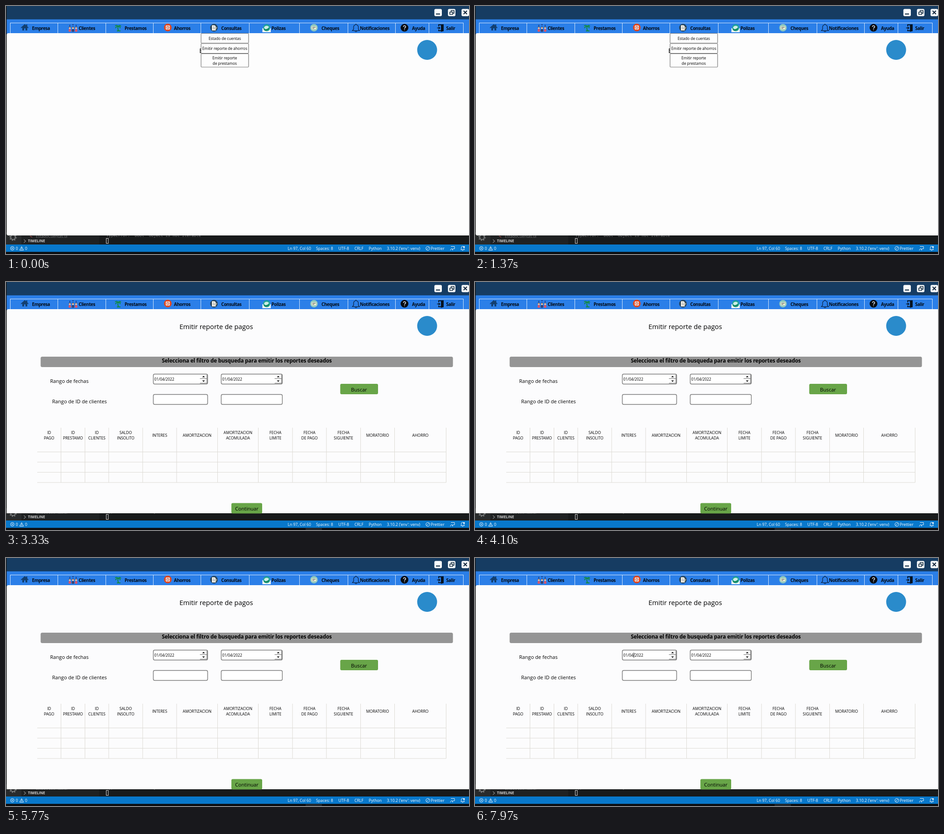
An HTML page for the animation above (8 s loop, 1023 by 548 pixels).

```html
<!DOCTYPE html>
<html lang="es">
<head>
<meta charset="utf-8">
<title>Reporte de pagos</title>
<style>
  html, body { margin: 0; width: 100%; height: 100%; overflow: hidden; background: #0c0d0f; }
  svg { display: block; width: 1023px; height: 548px; }
  text { font-family: "Open Sans", "Noto Sans", sans-serif; fill: #000; white-space: pre; }
  .mid { text-anchor: middle; }
  .menu { font-size: 9.9px; font-weight: 700; letter-spacing: -.4px; fill: #040c16; }
  .drop { font-size: 8.4px; }
  .title { font-size: 14.8px; }
  .banner { font-size: 11.8px; font-weight: 700; letter-spacing: -.17px; }
  .label { font-size: 11.1px; }
  .date { font-size: 8.3px; }
  .head { font-size: 8.6px; }
  .status { font-size: 8.7px; fill: #fff; }
  .side { font-size: 8.1px; font-weight: 700; fill: #d0d0d0; }
  .dim { font-size: 8.6px; fill: #707274; }
  .mono { font-family: "DejaVu Sans Mono", monospace; font-size: 8.7px; fill: #707274; }
</style>
</head>
<body>
<svg viewBox="0 0 1023 548">
  <!-- editor behind the window -->
  <g id="editor">
    <rect width="1023" height="548" fill="#181a1b"/>
    <rect y="500" width="34" height="27" fill="#292b2c"/>
    <rect x="34" y="500" width="172" height="27" fill="#1f2122"/>
    <circle cx="15.5" cy="511" r="5" fill="none" stroke="#7b7d7e" stroke-width="2"/>
    <circle cx="15.5" cy="511" r="7" fill="none" stroke="#7b7d7e" stroke-width="2" stroke-dasharray="2.7 2.8"/>
    <path d="M53 508l5 3" stroke="#a04848" stroke-width="1.3"/>
    <path d="M39.5 516l4 3.5-4 3.5" fill="none" stroke="#ccc"/>
    <rect x="221.5" y="513.5" width="4.500" height="11" fill="none" stroke="#ddd"/>
    <rect y="527" width="1023" height="16.5" fill="#0878cb"/>
    <rect y="543.5" width="1023" height="4.5" fill="#0b0d10"/>
    <g fill="none" stroke="#fff" stroke-width=".9">
      <circle cx="14" cy="535.5" r="4"/><path d="M12.4 533.9l3.2 3.2m0-3.2l-3.2 3.2"/>
      <path d="M34.5 531.5l4.3 8h-8.6zM34.5 534v3m0 .8v.9"/>
      <circle cx="932" cy="535.5" r="4.2"/><path d="M929 538.5l6-6"/>
      <path d="M983 531.5h8v5h-3l-2 2v-2h-1M982 540c0-5 5-5 5 0"/>
      <path d="M1005 538.5h8l-1-1.5v-3a3 3 0 0 0-6 0v3zM1008 540h2"/>
    </g>
    <circle cx="1012" cy="532.5" r="1.8" fill="#fff"/>
  </g>

  <!-- window frame -->
  <rect x="1.5" width="1022" height="30" fill="#163c62"/>
  <rect x="1.5" y="29.5" width="1022" height="32" fill="#2b7fe8"/>
  <g id="buttons"></g>
  <g fill="none" stroke="#10283e">
    <path d="M950 17.700h9" stroke-width="2.2"/>
    <path d="M980.500 13.500h6.500v5h-6.500zM983.500 13v-3h6.500v6h-3" stroke-width="1.6"/>
    <path d="M1011 10.500l7.500 7.500m0-7.500l-7.500 7.500" stroke-width="2.2"/>
  </g>
  <g id="menu"></g>

  <!-- menu icons -->
  <path d="M32.500 48l9-8 3 2.700v-2h2.500v4.300l3 3-1.500 1-1.500-1.300v6.300h-4v-4.500h-3v4.500h-4v-6.300l-1.800 1.300z" fill="#123f70"/>
  <g id="people"></g>
  <g fill="none" stroke="#118a45" stroke-width="2">
    <path d="M241 44q3.500-3 7 1q3-4 6 0M248 45q-5 0-6 4M248 45q5 0 4 4"/>
    <path d="M248 45q-2 6 1 10M245 55h8"/>
  </g>
  <circle cx="357.500" cy="47.500" r="8.500" fill="#e2481f"/>
  <rect x="353" y="43" width="9" height="9" rx="2" fill="#fff"/>
  <circle cx="357.500" cy="47.500" r="3.200" fill="#f3d2c8" stroke="#b53a22" stroke-width=".9"/>
  <path d="M357.500 45.500v2l1.500 1" fill="none" stroke="#b53a22" stroke-width=".8"/>
  <circle cx="459.500" cy="48" r="8.500" fill="#27465f"/>
  <path d="M455 42.500h6l2.500 2.500v9h-8.500z" fill="#f4f1e8"/>
  <path d="M457 46h4m-4 2.300h5m-5 2.300h5" stroke="#8a949c" stroke-width=".9"/>
  <path d="M462 52l4-5" stroke="#d7c9a6" stroke-width="1.500"/>
  <path d="M566.500 49h18.500v9h-18.500z" fill="#f2f5f2"/>
  <circle cx="576" cy="48" r="7.800" fill="#20a39a"/>
  <path d="M570 48q2-5 8-4l3 2q-2 5-8 5z" fill="#cdeee2"/>
  <path d="M570 52q5 3 11-2" fill="none" stroke="#168044" stroke-width="2"/>
  <circle cx="680.500" cy="48" r="8.300" fill="#91c9bf"/>
  <rect x="675.500" y="45" width="10" height="6.500" fill="#f0ead2"/>
  <path d="M677 47h7" stroke="#4c6b70" stroke-width="1.300"/><path d="M677 49.500h4" stroke="#4c6b70"/>
  <path d="M765.500 54.500h15.500l-2.500-3v-5a5.200 5.200 0 0 0-10.500 0v5zM771 55a2.300 2.300 0 0 0 4.500 0M773.200 41v-2" fill="none" stroke="#0a1c38" stroke-width="1.200"/>
  <circle cx="880.500" cy="48" r="8.600" fill="#080b10"/>
  <path d="M878.200 46a2.400 2.400 0 1 1 3.500 2q-1.200.6-1.200 2M880.500 51.600v1.600" fill="none" stroke="#dfe8f4" stroke-width="1.500"/>
  <path d="M955 40.500h12v15h-12v-3h2v1h4v-11h-4v2h-2z" fill="#071321"/>
  <path d="M961 42l5.500-1.500v15l-5.500 1.500z" fill="#071321"/>
  <path d="M952.500 48.500h6m-2.500-2.500l2.500 2.500-2.500 2.500" fill="none" stroke="#071321" stroke-width="1.700"/>

  <!-- empty page with its drop-down -->
  <g id="before">
    <path d="M1.500 63.500q0-3.500 4-3.500h1018v447h-1018q-4 0-4-4z" fill="#fdfdfd"/>
    <g id="drop"></g>
  </g>

  <!-- report form -->
  <g id="after">
    <path d="M1.500 63.500q0-3.500 4-3.500h1018v451h-1022z" fill="#fcfcfd"/>
    <rect x="662" y="543.500" width="36" height="4.500" fill="#24282d"/>
    <rect x="76.500" y="165" width="911" height="23" rx="3.500" fill="#959595"/>
    <g id="form"></g>
    <path id="caret" d="M351 209v11.500" stroke="#111"/>
  </g>
  <circle cx="930.500" cy="97" r="22" fill="#2a8bcb"/>
</svg>

<script>
const LOOP = 8000, OPEN_AT = 2770, FOCUS_AT = 6870, BLINK = 530;
const $ = id => document.getElementById(id);

function add(parent, tag, attrs, content) {
  const el = document.createElementNS("http://www.w3.org/2000/svg", tag);
  for (const k in attrs) el.setAttribute(k, attrs[k]);
  if (content) el.textContent = content;
  $(parent).append(el);
}
const text = (parent, x, y, cls, str) => add(parent, "text", { x, y, class: cls }, str);
const box = (parent, x, y, width, height, rx, fill, stroke = "none", sw = 1) =>
  add(parent, "rect", { x, y, width, height, rx, fill, stroke, "stroke-width": sw });
const line = (parent, d, stroke, sw = 1) =>
  add(parent, "path", { d, stroke, fill: "none", "stroke-width": sw });

// editor strip
text("editor", 66, 512, "dim", "EstadoCuentas.ui");
text("editor", 221.5, 510, "mono", "TypeError: 'bool' object is not iterable");
text("editor", 48.5, 522.2, "side", "TIMELINE");
[[21.5, "0"], [42, "0"], [622.5, "Ln 97, Col 60"], [685, "Spaces: 8"], [734.5, "UTF-8"],
 [770, "CRLF"], [801.5, "Python"], [841.5, "3.10.2 ('env': venv)"], [938.5, "Prettier"]]
  .forEach(([x, s]) => text("editor", x, 538.7, "status", s));

// title bar and menu
[946.5, 976.5, 1006.5].forEach(x => box("buttons", x, 6.5, 16.5, 16, 3, "#fafcfd"));
const cells = [9.5, 114.5, 220.5, 325.5, 430.5, 537.5, 648.5, 755.5, 860.5, 934.5, 1010.5];
line("menu", "M9 37.5H1011" + cells.map(x => `M${x} 37V60`).join(""), "#d9e9fb");
[[57.5, "Empresa"], [160.5, "Clientes"], [262, "Prestamos"], [371, "Ahorros"], [475.5, "Consultas"],
 [586.5, "Polizas"], [697, "Cheques"], [782, "Notificaciones"], [897, "Ayuda"], [972.5, "Salir"]]
  .forEach(([x, s]) => text("menu", x, 52.6, "menu", s));

["#d9546a", "#38416e", "#d9546a"].forEach((c, i) => {
  const x = 141 + i * 7;
  box("people", x - 2.7, 51, 5.4, 6, 2, c);
  add("people", "circle", { cx: x, cy: 48.5, r: 2.2, fill: "#efc4a0" });
  line("people", `M${x - 2.2} 47.5q2.2-3 4.4 0`, "#2b2440", 1.2);
  add("people", "circle", { cx: x, cy: i === 1 ? 41.5 : 43, r: 1.2, fill: "#26336b" });
});

// drop-down, with the covered title peeking out
text("drop", 427, 103.5, "title", "E");
[[60.5, 21.5], [83, 21.5], [105.5, 29.5]].forEach(([y, h]) => box("drop", 431, y, 105, h, 1.5, "#fdfdfd", "#777", 1.2));
[[74.5, "Estado de cuentas"], [97, "Emitir reporte de ahorros"], [117.5, "Emitir reporte"], [129.5, "de prestamos"]]
  .forEach(([y, s]) => text("drop", 483.3, y, "drop mid", s));

// form
text("form", 464.5, 103.5, "title mid", "Emitir reporte de pagos");
text("form", 532, 178, "banner mid", "Selecciona el filtro de busqueda para emitir los reportes deseados");
text("form", 97.5, 222.7, "label", "Rango de fechas");
text("form", 102, 268, "label", "Rango de ID de clientes");
[[325.5, 120], [475.5, 135]].forEach(([x, w]) => {
  const r = x + w;
  box("form", x, 203.5, w, 22, 3, "#fff", "#777", 1.4);
  box("form", x, 248.5, w, 22, 3, "#fff", "#777", 1.4);
  text("form", x + 2.2, 218.2, "date", "01/04/2022");
  line("form", `M${r - 17} 213.5h15.5M${r - 17} 223.5h15.5M${r - 1.5} 205v19`, "#666", 1.2);
  add("form", "path", { d: `M${r - 12} 210.5l3-3.2 3 3.2zM${r - 12} 217.5l3 3.2 3-3.2z`, fill: "#111" });
});
[[738.5, 225, 83.5, "Buscar", 780, 241.7], [498, 488.5, 68, "Continuar", 532, 505.2]].forEach(([x, y, w, s, tx, ty]) => {
  box("form", x, y, w, 23, 3, "#68a548");
  text("form", tx, ty, "label mid", s);
});

// table
const cols = [69, 121.5, 174.5, 227, 302, 377, 467.5, 557.5, 633, 708, 783.5, 858.5, 972.5];
const heads = ["ID|PAGO", "ID|PRESTAMO", "ID|CLIENTES", "SALDO|INSOLITO", "INTERES", "AMORTIZACION",
  "AMORTIZACION|ACOMULADA", "FECHA|LIMITE", "FECHA|DE PAGO", "FECHA|SIGUIENTE", "MORATORIO", "AHORRO"];
line("form", cols.slice(1).map(x => `M${x} 322V443`).join("") +
  [375.5, 398, 420.5, 443].map(y => `M69 ${y}H972.5`).join(""), "#dcdad4");
heads.forEach((h, i) => {
  const rows = h.split("|"), x = (cols[i] + cols[i + 1]) / 2;
  rows.forEach((s, j) => text("form", x, (rows.length > 1 ? 335.5 : 341.7) + j * 12, "head mid", s));
});

function show(id, on) { $(id).style.visibility = on ? "visible" : "hidden"; }
function draw() {
  const t = performance.now() % LOOP, open = t >= OPEN_AT, held = t - FOCUS_AT;
  show("before", !open);
  show("after", open);
  show("caret", held >= 0 && Math.floor(held / BLINK) % 2 === 0);
  requestAnimationFrame(draw);
}
draw();
</script>
</body>
</html>
```
